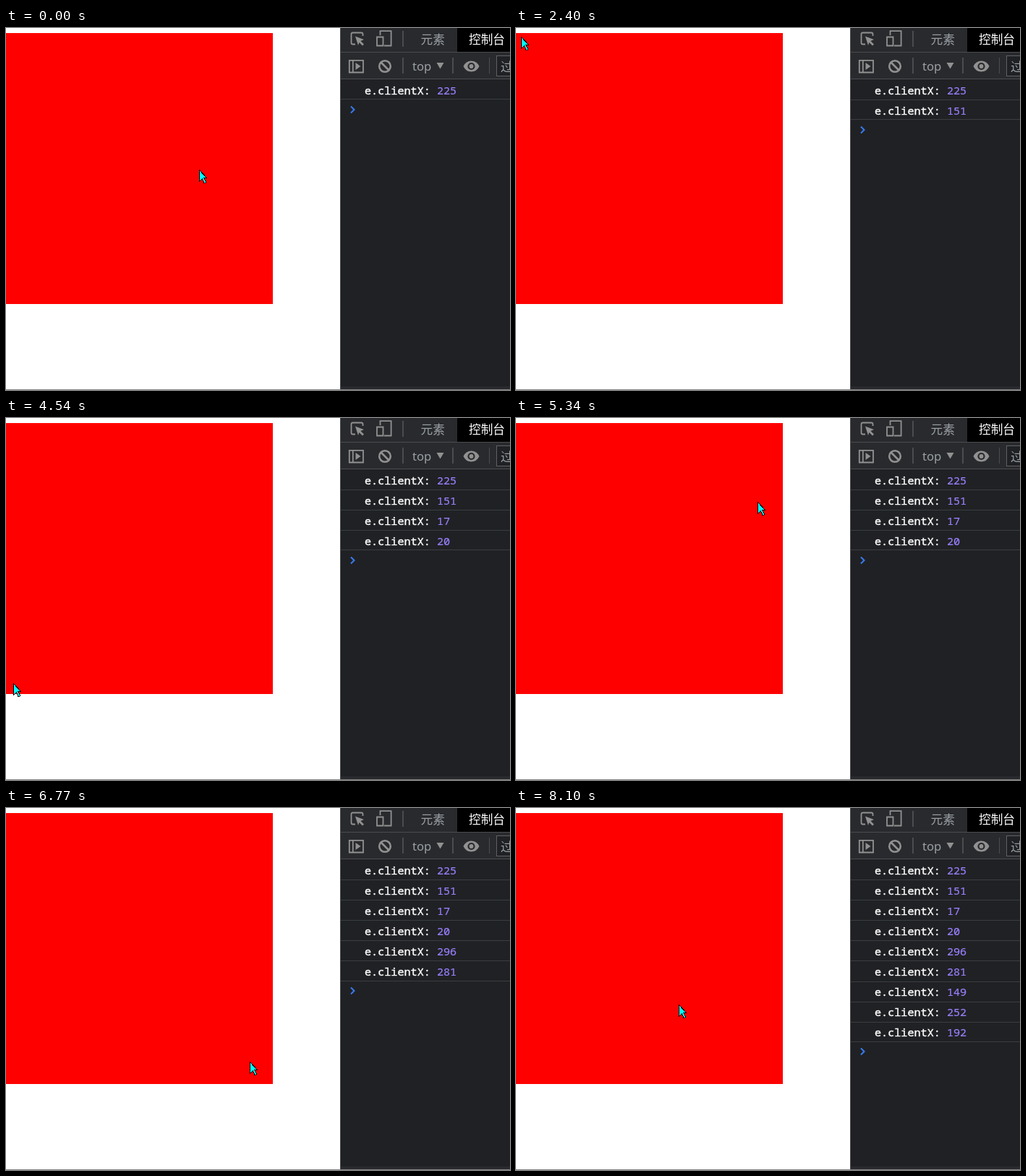
An HTML page for the animation above (9.79 s loop, 697 px wide and 501 px high).

```html
<!DOCTYPE html>
<html lang="zh">
<head>
<meta charset="utf-8">
<style>
html, body { margin: 0; width: 100%; height: 100%; overflow: hidden; background: #fff; }
svg { display: block; }
.ui { font: 16.7px "Noto Sans", "Noto Sans CJK SC", "Noto Sans CJK", sans-serif; fill: #9aa0a6; }
.ui .active { fill: #fff; }
.log { font: 15.15px "Noto Sans Mono", "DejaVu Sans Mono", monospace; fill: #fff; stroke: #fff; stroke-width: .4; white-space: pre; }
.num { fill: #9980ff; stroke: #9980ff; stroke-width: .2; }
.icon { fill: none; stroke: #919191; stroke-width: 1.8; }
.solid { fill: #919191; }
</style>
</head>
<body>
<svg width="697" height="501" viewBox="0 0 697 501">
  <rect y="7" width="369" height="375" fill="#f00"/>

  <g shape-rendering="crispEdges">
    <path fill="#494c50" d="M462 0h1v501h-1z"/>
    <path fill="#202124" d="M463 0h234v501H463z"/>
    <path fill="#292a2d" d="M463 0h234v70H463zM463 496h234v5H463z"/>
    <path fill="#000" d="M624 0h73v33h-73z"/>
    <path fill="#494c50" d="M463 33h234v1H463zM463 70h234v1H463z"/>
    <path fill="#4a4c50" d="M548 4h2v22h-2zM548 41h2v22h-2zM617 41h2v22h-2zM668 41h1v22h-1z"/>
    <path fill="#202124" stroke="#5f6165" d="M700 38.5H678.5V66.5H700"/>
    <path fill="#858585" d="M0 500h697v1H0z"/>
  </g>

  <g class="icon">
    <path d="M483 22.5H479.5Q477.5 22.5 477.5 20.5V8.5Q477.5 6.5 479.5 6.5H491.5Q493.5 6.5 493.5 8.5V11"/>
    <path d="M517.5 10V4.2H532.6V24.5H523M513 12.5H521.5V24.5H513Z"/>
    <path d="M474.800 44.800H494V61.500H474.800ZM479.800 45V61"/>
    <circle cx="524" cy="53" r="7.800" stroke-width="2.600"/>
    <path d="M518.500 47.500L529.500 58.500" stroke-width="2.600"/>
  </g>
  <g class="solid">
    <path d="M483 11.500L495 16L490.500 18L495 22.500L493 24.500L488.500 20L487 24Z"/>
    <path d="M483.500 48L490.500 53L483.500 58Z"/>
    <path d="M595.500 48H605.500L600.500 56.500Z"/>
    <path d="M632.500 53Q636 45.500 643.500 45.500T654.500 53Q651 60.500 643.500 60.500T632.500 53Z"/>
  </g>
  <circle cx="643.500" cy="53" r="4" fill="#919191" stroke="#292a2d" stroke-width="2.200"/>

  <g class="ui">
    <text x="573.5" y="22">元素</text>
    <text class="active" x="640" y="22">控制台</text>
    <text x="562" y="59">top</text>
    <text x="684" y="60">过</text>
  </g>

  <g id="rows"></g>
  <path id="prompt" d="M477 -4.500L481.500 0L477 4.500" fill="none" stroke="#367cf1" stroke-width="2"/>
  <path id="cursor" d="M.5 .5V16.500L4.500 12.500L7 18.500H8.500L9.500 17.500L7 11.500H10.500Z"
    fill="#0ff" stroke="#000" shape-rendering="crispEdges"/>
</svg>
<script>
const LOOP = 9790, STEP = 55, ROW = 28;

// Each click logs its clientX; the pointer gets there between start and end,
// optionally bending towards a control point.
const clicks = [
  { at: 0, value: 225, y: 196 },
  { at: 680, value: 151, y: 52, start: 215, end: 620 },
  { at: 2960, value: 17, y: 12, start: 1000, end: 1840, bend: [85, 308] },
  { at: 4540, value: 20, y: 367, start: 3245, end: 4350, bend: [38, 395] },
  { at: 5930, value: 296, y: 16, start: 4890, end: 5710, bend: [351, 235] },
  { at: 6770, value: 281, y: 351, start: 5930, end: 6530 },
  { at: 7140, value: 149, y: 179, start: 6770, end: 7080 },
  { at: 7710, value: 252, y: 97, start: 7380, end: 7560 },
  { at: 8100, value: 192, y: 272, start: 7710, end: 7910 }
];

const $ = id => document.getElementById(id);
const place = (el, x, y) => el.setAttribute('transform', `translate(${x} ${y})`);

// The page is shown at 125% and cropped on the left
const spot = click => [Math.round(1.25 * click.value - 14.6), click.y];

// Soft start, longer slow-down
const ease = s => {
  const u = 1 - (1 - s) ** 1.5;
  return u * u * (3 - 2 * u);
};

$('rows').innerHTML = clicks.map(({ value }, i) =>
  `<g><text class="log" x="496" y="${92 + ROW * i}">e.clientX: <tspan class="num">${value}</tspan></text>
   <rect x="463" width="234" height="1" fill="#3a3d41"/></g>`).join('');
const rows = [...$('rows').children];

function pointer(t) {
  const i = clicks.findLastIndex(click => t >= (click.start ?? 0));
  const to = spot(clicks[i]);
  if (!i) return to;
  const { start, end, bend } = clicks[i], from = spot(clicks[i - 1]);
  const steps = Math.round((end - start) / STEP);
  const u = ease(Math.min(1, Math.floor((t - start) / (end - start) * steps) / steps));
  return from.map((a, k) => {
    const b = to[k], c = bend ? bend[k] : (a + b) / 2;
    return Math.round(a * (1 - u) ** 2 + 2 * c * u * (1 - u) + b * u * u);
  });
}

function draw(now) {
  const t = now % LOOP;
  const last = clicks.findLastIndex(click => t >= click.at);
  rows.forEach((row, i) => {
    row.style.display = i <= last ? '' : 'none';
    row.lastElementChild.setAttribute('y', Math.round(98 + (ROW + .1) * i) + (i < last));
  });
  place($('prompt'), 0, 113 + ROW * last);
  place($('cursor'), ...pointer(t));
}

const begin = performance.now();
function tick() {
  draw(performance.now() - begin);
  requestAnimationFrame(tick);
}
tick();
</script>
</body>
</html>
```
